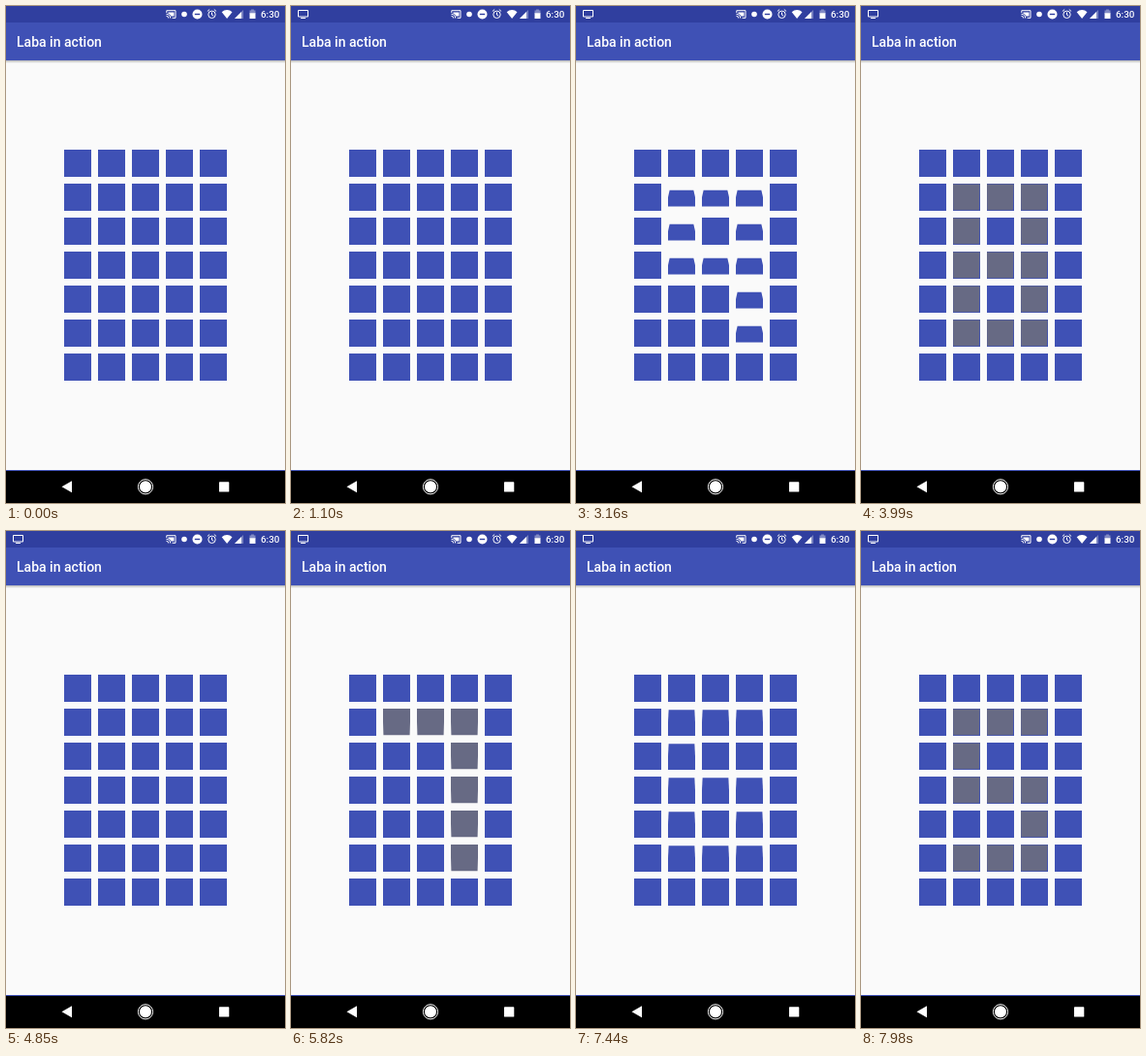
Animation, 288 px wide and 512 px high, one loop 8000 ms. Source, as an HTML page:

```html
<!DOCTYPE html>
<html lang="en">
<head>
<meta charset="utf-8">
<title>Laba in action</title>
<style>
  html, body { margin: 0; width: 100%; height: 100%; overflow: hidden; }
  body { position: relative; background: #fafafa; font-family: Roboto, sans-serif; }
  #chrome { position: absolute; left: 0; top: 0; }
  .cell { position: absolute; width: 28px; height: 28px; overflow: hidden; perspective: 85px; }
  .tile { position: relative; width: 28px; height: 28px; background: #3f51b5; }
  .tile.back { background: #676a84; }
  .tile.rest { background: #3f51b5; }
  .tile.rest::after {
    content: ""; position: absolute; inset: 0; background: #676a84;
    clip-path: polygon(0 .6px, 27.6px .6px, 26.9px 27.3px, .3px 27.3px);
  }
</style>
</head>
<body>
<svg id="chrome" width="288" height="512" viewBox="0 0 288 512">
  <defs>
    <linearGradient id="shade" x1="0" y1="0" x2="0" y2="1">
      <stop offset="0" stop-color="#000" stop-opacity=".27"/>
      <stop offset="1" stop-color="#000" stop-opacity="0"/>
    </linearGradient>
  </defs>
  <rect width="288" height="17" fill="#303f9f"/>
  <rect y="17" width="288" height="39" fill="#3f51b5"/>
  <rect y="56" width="288" height="3" fill="url(#shade)"/>
  <rect y="478" width="288" height="1" fill="#3f51b5"/>
  <rect y="479" width="288" height="33"/>
  <g fill="#fff">
    <text x="11" y="42" font-size="14" font-weight="500">Laba in action</text>
    <text x="263" y="12.3" font-size="9.8" font-weight="500">6:30</text>

    <!-- status icons -->
    <g id="screen" fill="none" stroke="#fff">
      <path d="M7.5 4.5h10v6.5h-10z"/>
      <path d="M10 12.5h5"/>
    </g>
    <g fill="none" stroke="#fff">
      <path d="M165.8 7V4.7h9.2v7.6h-3.4M165.5 8.3a4.2 4.2 0 0 1 4.2 4.2M165.5 10.3a2.2 2.2 0 0 1 2.2 2.2"/>
      <circle cx="212.5" cy="8.8" r="3.7"/>
      <path d="M212.5 6.5v2.6l1.7 1M207.9 5.5l2.3-2M217.1 5.5l-2.3-2"/>
    </g>
    <path d="M167.5 6.5h6v4h-3.2a5 5 0 0 0-2.8-2.8z"/>
    <circle cx="184" cy="8.5" r="2.8"/>
    <circle cx="197.5" cy="8.5" r="5"/>
    <rect x="194.8" y="7.8" width="5.4" height="1.4" fill="#303f9f"/>
    <path d="M222.7 6.2a8 8 0 0 1 10.8 0L228.1 13z"/>
    <path d="M245 4v9h-9z" opacity=".35"/>
    <path d="M243 6v7h-7z"/>
    <path d="M251.5 4.5h1.6v-1h2.8v1h1.6V8h-6z" opacity=".4"/>
    <path d="M251.5 7.3h6V13h-6z"/>

    <!-- navigation -->
    <path d="M57.5 495.3l10.5-6v12z"/>
    <circle cx="144" cy="495.3" r="6"/>
    <circle cx="144" cy="495.3" r="7.6" fill="none" stroke="#fff" stroke-width="1"/>
    <rect x="220" y="490.3" width="10.3" height="10.3" rx=".6"/>
  </g>
</svg>
<script>
const LOOP = 8000;
const COLS = 5, ROWS = 7;

// Five rows of three tiles per digit, with the times of both flips.
const digits = [
  { rows: '111101101101111', from: 100, to: 100, rest: 200, leave: 1100, gone: 1100 },
  { rows: '111101111001001', from: 2030, to: 2340, rest: 2340, leave: 2950, gone: 3295 },
  { rows: '111101111101111', from: 3440, to: 3790, rest: 3990, leave: 4355, gone: 4700 },
  { rows: '111001001001001', from: 4850, to: 5190, rest: 5210, leave: 5755, gone: 6130 },
  { rows: '111100111101111', from: 6250, to: 6580, rest: 6720, leave: 7175, gone: 7515 },
  { rows: '111100111001111', from: 7640, to: 7980, rest: 7980, leave: LOOP, gone: LOOP }
];

const tiles = [];
for (let r = 0; r < ROWS; r++) {
  for (let c = 0; c < COLS; c++) {
    const cell = document.createElement('div');
    const tile = document.createElement('div');
    cell.className = 'cell';
    cell.style.left = 60 + 35 * c + 'px';
    cell.style.top = 148 + 35 * r + 'px';
    tile.className = 'tile';
    cell.append(tile);
    document.body.append(cell);
    if (r > 0 && r < ROWS - 1 && c > 0 && c < COLS - 1) tiles.push(tile);
  }
}

const ease = p => p < .5 ? 2 * p * p : 1 - 2 * (1 - p) ** 2;
const progress = (t, a, b) => t >= b ? 1 : Math.max(0, (t - a) / (b - a));

function angleAt(d, t) {
  if (t < d.rest) return Math.min(174, 180 * ease(progress(t, d.from, d.to)));
  const a = 180 * (1 - ease(progress(t, d.leave, d.gone)));
  return a > 173 ? 180 : a;
}

const screenIcon = document.getElementById('screen');

function draw(now) {
  const t = now % LOOP;
  const digit = digits.find(d => t >= d.from && t < d.gone);
  const angle = digit ? angleAt(digit, t) : 0;
  screenIcon.style.visibility = t < 100 ? 'hidden' : 'visible';
  tiles.forEach((tile, i) => {
    const a = digit && digit.rows[i] === '1' ? angle : 0;
    const resting = a === 180;
    tile.className = 'tile' + (resting ? ' rest' : a > 90 ? ' back' : '');
    tile.style.transform = a === 0 || resting ? 'none' : `rotateX(${a}deg)`;
  });
  requestAnimationFrame(draw);
}
draw(performance.now());
</script>
</body>
</html>
```
